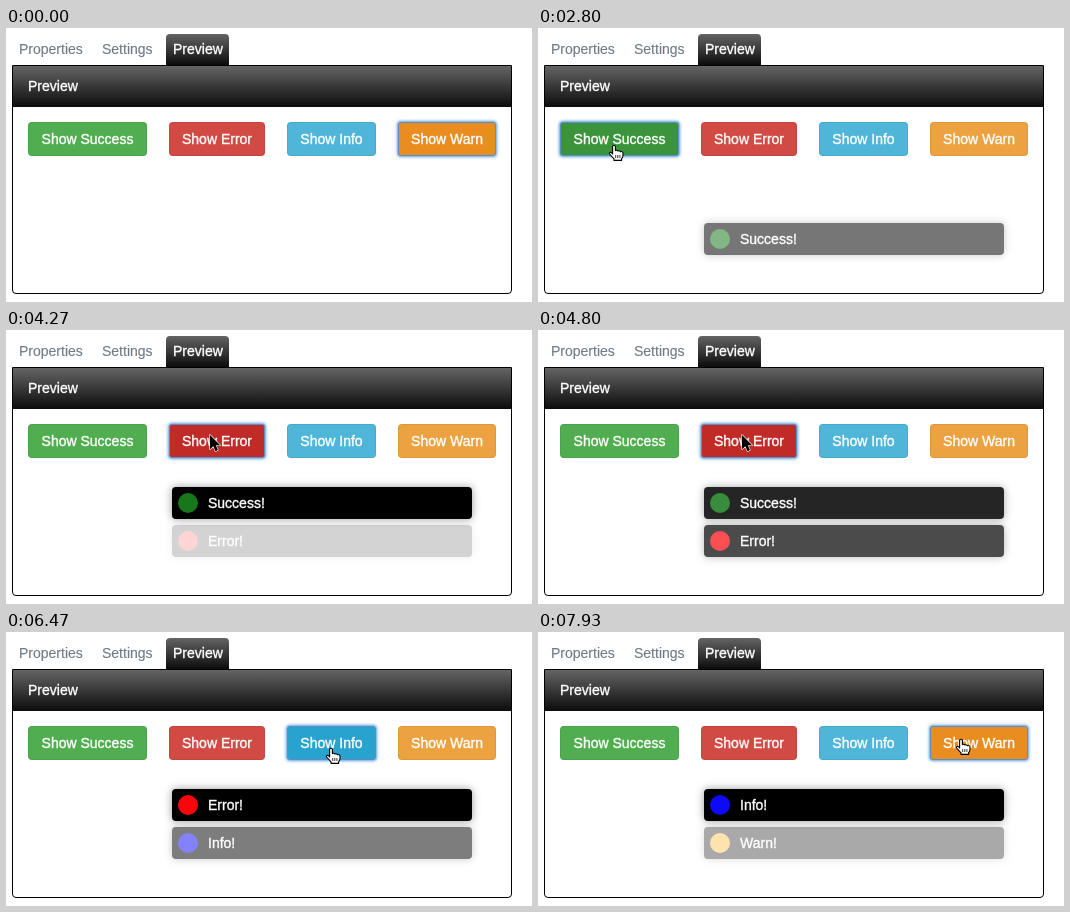
An HTML page that plays this animation: 526 by 274 pixels, repeating every 8000 ms.

```html
<!DOCTYPE html>
<html lang="en">
<head>
<meta charset="utf-8">
<title>Toast preview</title>
<style>
  html, body { margin: 0; width: 100%; height: 100%; overflow: hidden; background: #fff; }
  #stage {
    position: relative; width: 526px; height: 274px; overflow: hidden;
    font: 14px "Liberation Sans", Arial, sans-serif; color: #fff; white-space: nowrap;
  }
  #stage * { position: absolute; box-sizing: border-box; }
  .tab { top: 6px; height: 31px; line-height: 30px; color: #6f7b87; -webkit-text-stroke: .15px; }
  .bar { background: linear-gradient(#646464, #0c0c0c); -webkit-text-stroke: .35px; }
  .tab.bar { left: 160px; width: 63px; padding-left: 7px; color: #fff; border-radius: 4px 4px 0 0; }
  .panel { left: 6px; top: 37px; width: 500px; height: 229px; border: 1px solid #000; border-radius: 0 0 4px 4px; }
  .head { left: 0; top: 0; width: 498px; height: 41px; line-height: 41px; padding-left: 15px; }
  .btn {
    top: 94px; height: 34px; line-height: 32px; text-align: center;
    border: 1px solid rgba(0, 0, 0, .07); border-radius: 4px; -webkit-text-stroke: .35px;
  }
  .btn.focus { border-color: #5b8fc4; border-radius: 3px; box-shadow: 0 0 3px 1px #5a9ce0; }
  .toast {
    left: 166px; width: 300px; height: 32px; line-height: 32px; padding-left: 36px;
    background: #000; border-radius: 4px; box-shadow: 0 0 8px #999; -webkit-text-stroke: .35px;
  }
  .dot { left: 6px; top: 6px; width: 20px; height: 20px; border-radius: 50%; }
  #pointer { left: 0; top: 0; width: 24px; height: 24px; overflow: visible; }
</style>
</head>
<body>
<div id="stage">
  <div class="tab" style="left:13px">Properties</div>
  <div class="tab" style="left:96px">Settings</div>
  <div class="tab bar">Preview</div>
  <div class="panel"><div class="head bar">Preview</div></div>
  <svg id="pointer">
    <path id="arrow" d="M0 0V14.2L3.3 11.2L5.5 16.2L8 15.1L5.8 10.2H10.2Z"
      fill="#000" stroke="#fff" stroke-width="1.2" stroke-linejoin="round" paint-order="stroke"/>
    <g id="hand" fill="#fff" stroke="#000" stroke-width="1.1" stroke-linejoin="round">
      <path d="M-1.4 9V1.4Q-1.3 .2 0 .2Q1.3 .2 1.4 1.4V5.6Q2.8 4.8 4 6Q5.4 5.3 6.5 6.6Q9 6.2 9 8.4
        V10.5Q8.8 12.6 7.6 13.6V15.4H0V13.8L-4.4 9Q-4.8 7.4-3.4 7.3Q-2.3 7.6-1.4 9Z"/>
      <path d="M1.7 10V13M3.8 10V13M5.9 10V13" stroke-width=".8"/>
    </g>
  </svg>
</div>
<script>
const LOOP = 8000, FPS = 15;
const ENTER = 1000, LEAVE_AT = 2400, LEAVE = 900;
const ROW = 38, LOWEST = 195;

// name, left, width, colour, active colour, dot colour, click time
const kinds = [
  ['Success', 22, 119, '#50ae50', '#3b943c', '#16781a', 2265],
  ['Error', 163, 96, '#d24a44', '#c02b28', '#fc050a', 4100],
  ['Info', 281, 89, '#4fb6d9', '#28a3d0', '#0e0af8', 5960],
  ['Warn', 392, 98, '#eca240', '#e98d20', '#ffae10', 7600],
].map(([name, x, w, color, active, dot, click]) => ({ name, x, w, color, active, dot, click }));

// time, x, y of the pointer tip
const path = [
  [0, 85, 285], [670, 85, 285], [930, 85, 210],
  [1200, 85, 210], [1267, 85, 202], [1867, 76, 117],
  [3130, 76, 117], [3800, 204, 105],
  [4870, 204, 105], [5530, 320, 116], [5660, 320, 116], [5860, 325, 116],
  [6600, 325, 116], [7330, 423, 107], [LOOP, 423, 107],
];

const stage = document.getElementById('stage');
const pointer = document.getElementById('pointer');
const arrow = document.getElementById('arrow');
const hand = document.getElementById('hand');
const clamp = v => Math.min(1, Math.max(0, v));

function add(cls, text, parent = stage) {
  const el = document.createElement('div');
  el.className = cls;
  el.textContent = text;
  if (parent === stage) stage.insertBefore(el, pointer);
  else parent.append(el);
  return el;
}

for (const k of kinds) {
  k.btn = add('btn', 'Show ' + k.name);
  k.btn.style.left = k.x + 'px';
  k.btn.style.width = k.w + 'px';
  k.toast = add('toast', k.name + '!');
  add('dot', '', k.toast).style.background = k.dot;
}

function tipAt(t) {
  const i = path.findIndex(p => p[0] > t);
  const [t0, x0, y0] = path[i - 1], [t1, x1, y1] = path[i];
  const e = Math.sin((t - t0) / (t1 - t0) * Math.PI / 2);
  return [x0 + (x1 - x0) * e, y0 + (y1 - y0) * e];
}

function render(t) {
  const [x, y] = tipAt(t);
  const clicked = kinds.filter(k => k.click <= t);
  const focused = clicked.length ? clicked[clicked.length - 1] : kinds[3];
  let over = null;

  kinds.forEach((k, i) => {
    const hover = x >= k.x && x < k.x + k.w && y >= 94 && y < 128;
    if (hover) over = k;
    k.btn.style.background = hover || k === focused ? k.active : k.color;
    k.btn.classList.toggle('focus', k === focused);

    const age = t - k.click;
    k.toast.style.opacity = Math.min(clamp(age / ENTER), 1 - clamp((age - LEAVE_AT) / LEAVE));
    k.toast.style.top = LOWEST - ROW * Math.max(0, clicked.length - 1 - i) + 'px';
  });

  // the pointer falls back to an arrow once the error toast is pushed
  const isHand = over && !(over === kinds[1] && t >= over.click);
  hand.style.display = isHand ? '' : 'none';
  arrow.style.display = isHand ? 'none' : '';
  pointer.style.transform = `translate(${Math.round(x)}px, ${Math.round(y)}px)`;
}

const start = performance.now();
function tick() {
  const t = (performance.now() - start) % LOOP;
  render(Math.min(Math.floor((t + 5) * FPS / 1000) * 1000 / FPS, LOOP - 1));
  requestAnimationFrame(tick);
}
tick();
</script>
</body>
</html>
```
